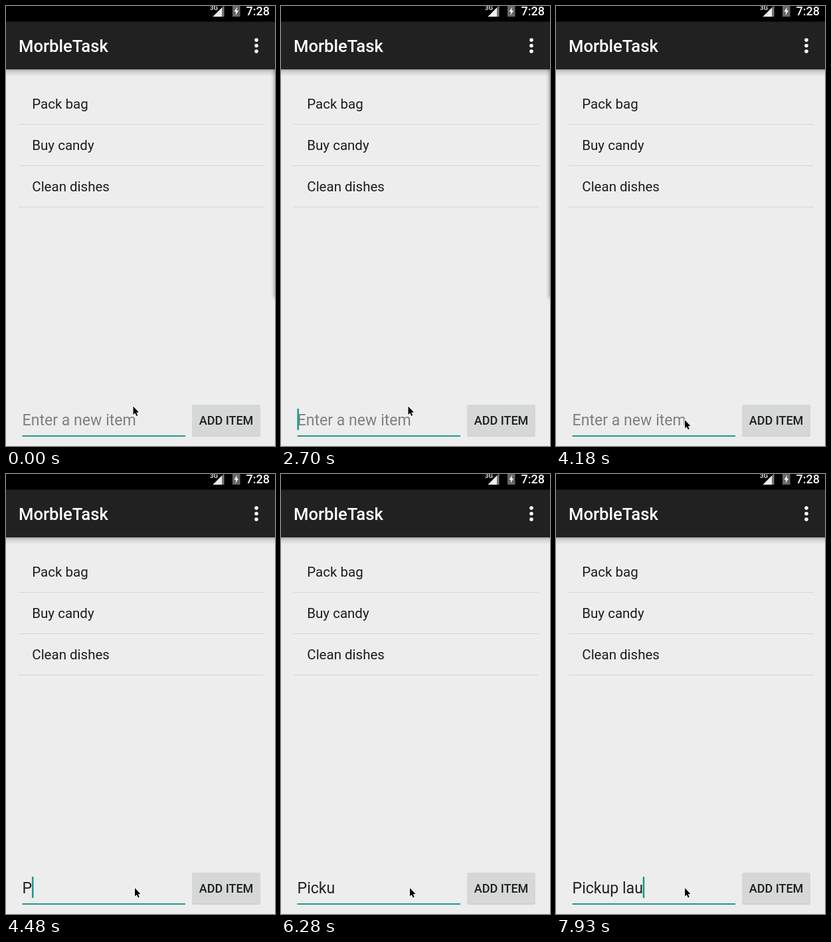
These frames come from a looping animation (405x660 px, 8000 ms). An HTML page:

```html
<!DOCTYPE html>
<html lang="en">
<head>
<meta charset="utf-8">
<title>To-do list</title>
<style>
  html, body { margin: 0; width: 100%; height: 100%; overflow: hidden; background: #ededed; }
  svg { display: block; width: 405px; height: 660px; font-family: Roboto, Arial, sans-serif; }
  .title { font-size: 25.67px; font-weight: 500; fill: #fff; }
  .clock { font-size: 18px; font-weight: 500; fill: #fff; }
  .net { font-size: 9.5px; font-weight: 700; fill: #ddd; }
  .item { font-size: 20.5px; fill: #1c1c1c; }
  .button { font-size: 18px; font-weight: 500; fill: #1e1e1e; text-anchor: middle; }
  .field { font-size: 23.1px; white-space: pre; }
</style>
</head>
<body>
<svg viewBox="0 0 405 660">
  <defs>
    <filter id="blur" filterUnits="userSpaceOnUse" x="380" y="40" width="100" height="430">
      <feGaussianBlur stdDeviation="3"/>
    </filter>
    <linearGradient id="drop" x1="0" y1="0" x2="0" y2="1">
      <stop offset="0" stop-color="#000" stop-opacity=".3"/>
      <stop offset=".35" stop-color="#000" stop-opacity=".12"/>
      <stop offset="1" stop-color="#000" stop-opacity=".01"/>
    </linearGradient>
  </defs>
  <rect width="405" height="660" fill="#ededed"/>
  <rect id="edge" x="405" y="60" width="50" height="378" opacity=".5" filter="url(#blur)"/>

  <rect y="95" width="405" height="10" fill="url(#drop)"/>
  <rect y="23" width="405" height="72" fill="#212121"/>
  <rect width="405" height="23.5"/>
  <text class="title" x="19" y="68.5">MorbleTask</text>
  <g fill="#fff">
    <circle cx="377" cy="51" r="2.8"/>
    <circle cx="377" cy="59.5" r="2.8"/>
    <circle cx="377" cy="68" r="2.8"/>
  </g>

  <text class="net" x="307" y="6">3G</text>
  <path d="M311.5 16H328.5V-1Z" fill="#777"/>
  <path d="M311.5 16H325V2.5Z" fill="#eee"/>
  <path d="M341 0H352.5V16H341Z" fill="#666"/>
  <path d="M348 1.5L343.5 8.5H346.4L345.5 14L350 6.8H347.2Z" fill="#fff"/>
  <text class="clock" x="361.5" y="14">7:28</text>

  <g class="item">
    <text x="39.3" y="154">Pack bag</text>
    <text x="39.3" y="216">Buy candy</text>
    <text x="39.3" y="278">Clean dishes</text>
  </g>
  <path d="M19 177.5H388M19 239.5H388M19 301.5H388" stroke="#d5d5d5"/>

  <rect x="280" y="598.5" width="103" height="47.3" rx="2.5" fill="#c6c7c7"/>
  <rect x="280" y="598" width="103" height="46.8" rx="2.5" fill="#d6d7d7"/>
  <text class="button" x="331.5" y="628">ADD ITEM</text>

  <rect x="24.6" y="644" width="245.4" height="2" fill="#1f998e"/>
  <text id="hint" class="field" x="24.6" y="629" fill="#808080">Enter a new item</text>
  <text id="typed" class="field" x="24.6" y="629" fill="#212121" xml:space="preserve"></text>
  <rect id="caret" y="604" width="2.5" height="32" fill="#109c8e"/>
  <path id="mouse" d="M1 1V13.4L3.8 10.9L5.8 15.5L7.8 14.6L5.8 10.2L9.6 10Z"
        stroke="#fff" stroke-width="2" paint-order="stroke" stroke-linejoin="round"/>
</svg>
<script>
  const LOOP = 8000;
  const EDGE_END = 3290;

  // Each track is a list of [start ms, value]
  const blink = [
    [0, 0], [150, 1], [600, 0], [1650, 1], [2100, 0], [2700, 1], [3140, 0],
    [3730, 1], [4180, 0], [4480, 1], [5530, 0], [5830, 1], [6280, 0],
    [6880, 1], [7480, 0], [7630, 1]
  ];
  const typing = [
    [0, ""], [4480, "P"], [4780, "Pi"], [4930, "Pick"], [5830, "Picku"],
    [6880, "Pickup"], [7030, "Pickup "], [7630, "Pickup l"],
    [7780, "Pickup la"], [7930, "Pickup lau"]
  ];
  const pointer = [
    [0, "190.5 599.5"], [3000, "192 612"], [3140, "190.5 619.5"],
    [3290, "191.5 618"], [3430, "193 620"]
  ];

  const el = id => document.getElementById(id);
  const [edge, hint, typed, caret, mouse] =
    ["edge", "hint", "typed", "caret", "mouse"].map(el);

  function valueAt(track, t) {
    let value = track[0][1];
    for (const [start, v] of track) if (t >= start) value = v;
    return value;
  }

  const show = (node, on) => node.setAttribute("visibility", on ? "visible" : "hidden");

  function draw(t) {
    const text = valueAt(typing, t);
    if (typed.textContent !== text) typed.textContent = text;
    const width = text ? typed.getComputedTextLength() : 0;
    caret.setAttribute("x", 24.4 + width);
    mouse.setAttribute("transform", `translate(${valueAt(pointer, t)})`);
    show(caret, valueAt(blink, t));
    show(hint, !text);
    show(edge, t < EDGE_END);
  }

  const begin = performance.now();
  function tick() {
    draw((performance.now() - begin) % LOOP);
    requestAnimationFrame(tick);
  }
  tick();
</script>
</body>
</html>
```
